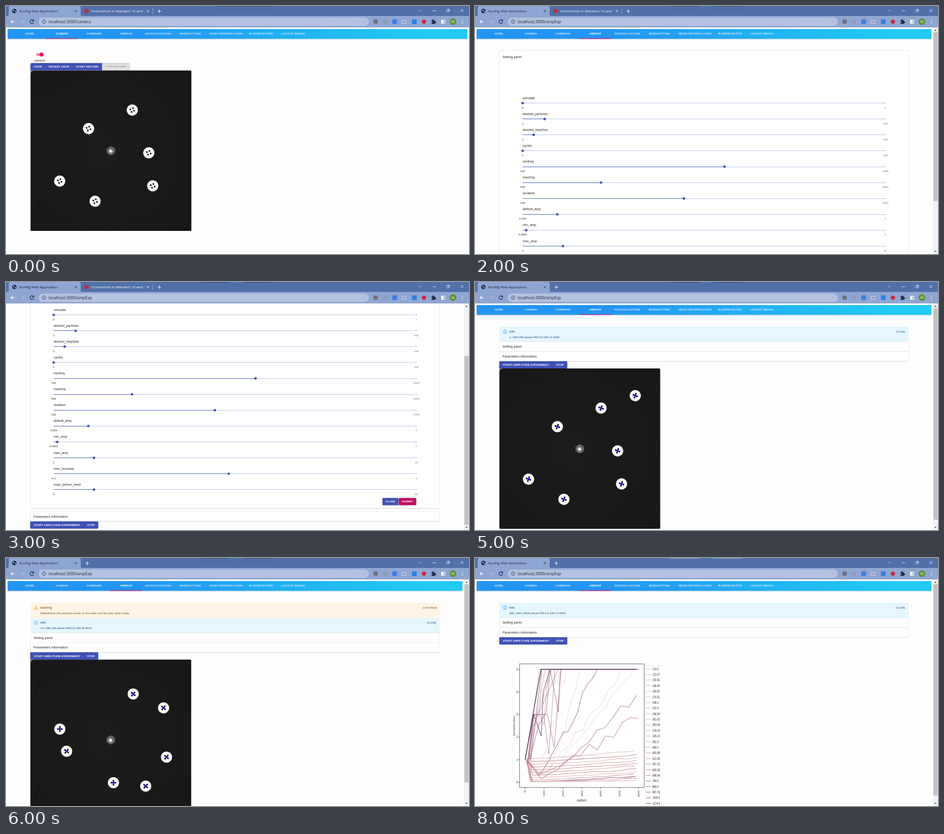
Recreate the animation shown at these times as an HTML page. Size 1022x548 px, loop 10000 ms.

```html
<!DOCTYPE html>
<html lang="en">
<head>
<meta charset="utf-8">
<title>Web application tour</title>
<style>
html, body { margin: 0; width: 100%; height: 100%; overflow: hidden; background: #fefefe; }
svg { display: block; width: 100vw; height: 100vh; }
text { font-family: "Liberation Sans", Arial, sans-serif; white-space: pre; }
.ui { font-family: "Open Sans", "Noto Sans", sans-serif; }
.b { font-weight: 700; letter-spacing: .02em; }
.p { letter-spacing: .01em; }
.m { letter-spacing: .03em; }
.plot { font-family: "DejaVu Sans", sans-serif; }
</style>
</head>
<body>
<svg id="stage" viewBox="0 0 1022 548" preserveAspectRatio="none">
  <defs>
    <linearGradient id="bar" gradientUnits="userSpaceOnUse" x1="252" y1="320" x2="770" y2="-197">
      <stop offset=".3" stop-color="#2196f3"/><stop offset=".9" stop-color="#21cbf3"/>
    </linearGradient>
    <radialGradient id="plate" cx=".45" cy=".5" r=".75">
      <stop offset="0" stop-color="#1c1c1c"/><stop offset="1" stop-color="#171717"/>
    </radialGradient>
    <filter id="shade" x="-5%" y="-40%" width="110%" height="200%">
      <feDropShadow dx="0" dy=".8" stdDeviation=".9" flood-color="#345" flood-opacity=".35"/>
    </filter>
    <clipPath id="page"><rect y="47" width="1022" height="501"/></clipPath>
    <clipPath id="tabText"><rect x="186" width="119" height="22"/></clipPath>
  </defs>
</svg>
<script>
const LOOP = 10000, STEP = 1000;
const INDIGO = '#3f51b5', PINK = '#f50057', DARK = '#202020';
const stage = document.getElementById('stage');

const rect = (x, y, w, h, fill, more = '') =>
  `<rect x="${x}" y="${y}" width="${w}" height="${h}" fill="${fill}" ${more}/>`;
const disc = (x, y, r, fill, more = '') =>
  `<circle cx="${x}" cy="${y}" r="${r}" fill="${fill}" ${more}/>`;
const path = (d, stroke, width = 1, more = '') =>
  `<path d="${d}" fill="none" stroke="${stroke}" stroke-width="${width}" ${more}/>`;
// y is the middle of the capitals
const text = (x, y, s, size, fill, cls = 'p', anchor = 'start') =>
  `<text x="${x}" y="${y + size * .36}" font-size="${size}" fill="${fill}" class="${cls}" text-anchor="${anchor}">${s}</text>`;
const cross = (x, y, r, color, width = 1) =>
  path(`M${x - r} ${y - r}l${2 * r} ${2 * r}m0 ${-2 * r}l${-2 * r} ${2 * r}`, color, width);
const plus = (x, y) => path(`M${x - 4} ${y}h8m-4 -4v8`, '#fff', 1.2);
const shaded = s => `<g filter="url(#shade)">${s}</g>`;

function randomFrom(seed) {
  return () => (seed = seed * 16807 % 2147483647) / 2147483647;
}

// ---- browser frame ----
function chrome(url, twoTabs, strip, blueX) {
  const ink = '#1d2a44';
  let s = rect(0, 0, 1022, 23, '#5070a8') + rect(0, 22, 1022, 25, '#8fa6d2') +
    rect(0, 46.4, 1022, .8, '#7f93b8');
  s += rect(431, 0, 160, 1, strip) + rect(blueX, 0, 31, 1, '#1f86e0');
  s += '<path d="M2 23q4 0 4 -5v-13q0 -5 5 -5h149q5 0 5 5v13q0 5 4 5z" fill="#8fa6d2"/>';
  s += disc(18.5, 11, 4.8, '#17233f') +
    '<path d="M15 9l3 -1 1 2 -2 2zM19 12l3 -2v3l-2 1.5z" fill="#9db2d8"/>';
  s += text(29, 11, 'NuvRig Web Application', 7.7, ink, 'ui') + cross(154, 11.3, 2.4, ink);
  if (twoTabs) {
    s += rect(173, 7, 9, 8, '#c0303a') +
      `<g clip-path="url(#tabText)">${text(188, 11, 'Screenshots in Mandero 10 and', 7.7, '#fff', 'ui')}` +
      text(302.5, 11, 'V', 7.7, '#9db0d2', 'ui') + '</g>' +
      cross(313, 11.3, 2.4, '#fff') + rect(323.5, 5, .9, 13, '#9eb1d4') + plus(338.5, 11.5);
  } else s += plus(179.5, 11.5);

  s += path('M912 8.5l3 3 3 -3', '#dce5f5', .9) + path('M942 10.5h7', '#fff', .9) +
    path('M973 8.5h4.5v4.5h-4.5zM974.5 8.5v-1.5h4.5v4.5h-1.5', '#fff', .8) + cross(1006.5, 10, 3, '#fff', .9);

  s += path('M19 34.5h-8m3.5 -3.5l-3.5 3.5 3.5 3.5', '#fff', 1.3) +
    path('M32 34.5h8m-3.5 -3.5l3.5 3.5 -3.5 3.5', '#b1c1e0', 1.1) +
    path('M60.5 32.2a4 4 0 1 0 .5 3.5M61 30v3h-3', ink, 1.3);
  s += rect(72, 25.5, 729, 18.5, '#b3c2e0', 'rx="9.2"') +
    path('M84 30.6a4 4 0 1 0 .01 0M84 34v2.8M84 32.2v1', ink, .9) +
    text(94, 34.7, url, 8.8, '#1b2233', 'ui');
  for (let i = 0; i < 4; i++) s += disc(725 + i * 21.7, 34.5, 3, '#adb9d2', 'opacity=".5"');

  s += rect(811.5, 30, 9, 9, '#6d6f78') + rect(833, 30, 8, 9, '#8c9cbd') +
    rect(853, 29.5, 10, 10, '#3c7be0') +
    path('M875 31.5h8v7h-8z', '#fff', 1.1, 'stroke-dasharray="2 1.3"') +
    rect(896, 29.5, 10.5, 10.5, '#2a83e6') + disc(922.5, 34.7, 4.8, '#d0213f') +
    `<path d="M939 32h2.5a1.7 1.7 0 1 1 3 0h2.5v2.5a1.7 1.7 0 1 1 0 3v2h-8v-2.3a1.6 1.6 0 1 0 0 -2.8z" fill="${ink}"/>` +
    rect(960.5, 30.5, 9, 8.5, '#fff') + rect(966, 31.5, 2.5, 6.5, '#8fa6d2') +
    disc(986.5, 34.5, 7.6, '#5f9636') + text(986.5, 34.7, 'M', 7, '#fff', 'ui', 'middle');
  for (let i = -1; i <= 1; i++) s += disc(1007.5, 34.5 + i * 3.5, .9, '#fff');
  return s;
}

// ---- page parts ----
const tabs = ['HOME', 'CAMERA', 'COMMAND', 'AMPEXP', 'DATACOLLECTING', 'MODELFITTING',
  'OBJECTMANIPULATION', 'BLOBDETECTOR', 'LOGOUT (MARA)'];

function nav(active, right) {
  let s = rect(3.7, 51, right - 3.7, 21.5, 'url(#bar)', 'filter="url(#shade)"');
  let x = 17;
  for (const name of tabs) {
    const w = Math.max(70.95, name.length * 4.7), on = name === active;
    s += text(x + w / 2, 61.2, name, 6.15, on ? '#fff' : '#d0eafc', 'b', 'middle');
    if (on) s += rect(x, 71.4, w, 1.1, PINK);
    x += w;
  }
  return s;
}

function button(x, y, w, label, fill = INDIGO, ink = '#fff') {
  return rect(x, y, w, 15.7, fill, 'rx="1.5"') + text(x + w / 2, y + 7.85, label, 6.15, ink, 'b', 'middle');
}

function startStop(x, y) {
  return shaded(rect(x, y, 149.7, 15.7, INDIGO, 'rx="1.7"')) +
    button(x, y, 118, 'START AMPLITUDE EXPERIMENT') + button(x + 118, y, 31.7, 'STOP') +
    rect(x + 117.8, y, .5, 15.7, '#303f9f');
}

function panel(x, y, right, h, label, labelY = y + h / 2) {
  return rect(x - .3, y, right - x + .6, h + .8, '#bdbdbd', 'rx="1.5"') +
    rect(x, y - .3, right - x, h + .3, '#e2e2e2') + rect(x, y + .3, right - x, h - .3, '#fff') +
    text(x + 7, labelY, label, 7.1, DARK);
}

function alertBox(y, kind, message, action) {
  const warn = kind === 'warning', ink = warn ? '#663c00' : '#0d3c61';
  const icon = warn
    ? path(`M66 ${y + 7}l4 7.2h-8zM66 ${y + 9.5}v2.3m0 .6v.8`, '#ff9800', .9)
    : path(`M66 ${y + 6.8}a3.9 3.9 0 1 0 .01 0m0 3.3v3.2m0 -5v.9`, '#2196f3', .9);
  return rect(53.8, y, 903, 33.4, warn ? '#fff4e5' : '#e5f6fd', 'rx="1.5"') + icon +
    text(76, y + 10.6, kind, 7.1, ink) + text(76, y + 22.4, message, 6.2, ink) +
    text(949.5 + (warn ? 2 : 0), y + 10.6, action, 5.8, ink, 'm', 'end');
}

function scrollbar(top, length) {
  return rect(1011, 47, 11, 501, '#f1f1f1') + rect(1012, top, 9, length, '#c1c1c1') +
    '<path d="M1014 55l2.5 -3 2.5 3z" fill="#505050"/><path d="M1014 541l2.5 3 2.5 -3z" fill="#505050"/>';
}

// ---- camera plate ----
const sparse = [[224.5, 87.5], [128, 128.5], [261, 182], [64.3, 244.5], [269.7, 255], [142.5, 289]];
const spread = [[227, 76], [294, 106.7], [65, 153.5], [80, 202.5], [300.5, 215.5], [183.3, 272], [254.6, 279.5]];
const added = [...sparse, [300, 60]];
const late = spread.map(([x, y], i) => [x + 18 * Math.sin(i * 2), y + 15 * Math.cos(i * 3)]);
const evenTurn = () => 20;
const mixedTurn = i => i % 3 < 2 ? 40 : 0;

function camera(x, y, pieces, turn, tracked) {
  let s = `<g transform="translate(${x} ${y})">` + rect(0, 0, 355, 354.5, 'url(#plate)', 'rx="2"') +
    '<path d="M0 0h8q-7 1 -8 8z" fill="#777"/>';
  s += '<g transform="translate(177.5 177.5)"><path d="M-9 -5l9 -5 9 5v10l-9 5 -9 -5z" fill="#2b2b2b" stroke="#777" stroke-width=".8"/>' +
    disc(0, 0, 7.5, '#555', 'stroke="#aaa" stroke-width=".9"') + disc(-.5, 1, 4.8, '#aaa') +
    '<path d="M-4 1l4 -5v4l4 1 -4 2z" fill="#fff"/></g>';
  pieces.forEach(([px, py], i) => {
    s += `<g transform="translate(${px} ${py}) rotate(${turn(i)})">` + disc(0, 0, 12.3, '#fff', 'stroke="#999" stroke-width=".5"');
    for (let k = 0; k < 4; k++) s += disc(4.4, 0, 2, '#222', `transform="rotate(${k * 90})"`);
    if (tracked) s += path('M-4.5 0h9M0 -4.5v9', '#101030', 2.6) + path('M-4 0h8M0 -4v8', '#1616ee', 1.4) + disc(0, 0, 2, '#1616ee');
    s += '</g>';
  });
  return s + '</g>';
}

// ---- settings: name, min, max, value ----
const settings = [
  ['simulate', 0, 1, 0], ['desired_particles', 1, 100, 7], ['desired_stepSize', 1, 100, 4],
  ['cycles', 1, 100, 1], ['minfreq', 100, 1000, 601], ['maxfreq', 500, 2000, 824],
  ['duration', 100, 1000, 500], ['default_amp', .005, 1, .1], ['min_amp', .0001, 1, .01],
  ['max_amp', 1, 10, 2], ['max_increase', .1, 3, 1.5], ['exps_before_reset', 5, 50, 10]];

function settingsPage() {
  const left = 105.3, width = 800.5;
  let s = panel(53.8, 98.5, 957, 543.5, 'Setting panel', 112.5);
  settings.forEach(([name, min, max, value], i) => {
    const y = 214.6 + i * 35.1, row = Math.round(y - .5), run = width * (value - min) / (max - min);
    s += text(left, y - 11.5, name, 7.1, DARK) +
      rect(left, row, width, 1, '#b8bfe3') + rect(left, row, run, 1, INDIGO) +
      rect(left + width - .5, row, 1.2, 1, INDIGO) + disc(left + run, y, 2.7, INDIGO) +
      text(left, y + 9.8, min, 6.2, DARK, 'p', 'middle') +
      text(left + width, y + 9.8, max, 6.2, '#757575', 'p', 'middle');
  });
  return s + shaded(button(831, 619.3, 35.2, 'CLOSE') + button(867, 619.3, 38.5, 'SUBMIT', '#c51162')) +
    panel(53.8, 649.3, 957, 21.3, 'Parameters Information') + startStop(53.7, 671);
}

// ---- chart ----
const shades = [[237, 209, 203], [218, 164, 168], [178, 117, 140], [128, 78, 115], [82, 49, 91], [45, 30, 62]];
function hue(t) {
  const p = Math.min(t, .999) * 5, i = Math.floor(p);
  return `rgb(${shades[i].map((c, k) => Math.round(c + (shades[i + 1][k] - c) * (p - i)))})`;
}
const plotX = x => 110.7 + x * .4175;
const plotY = y => 495.5 - y * 49.9;

function curve(points, shade, width, opacity = .8) {
  const d = points.map(([x, y]) => plotX(x).toFixed(1) + ' ' + plotY(Math.max(.02, Math.min(5, y))).toFixed(1));
  return path('M' + d.join('L'), hue(shade), width, `opacity="${opacity}" stroke-linejoin="round"`);
}

// a drop from 1, then a rise to top with some jitter
function course(from, low, top, end, bend, jitter, random) {
  const points = [[5 + random() * 12, 1], [from, low]], steps = 12;
  for (let i = 1; i <= steps; i++) {
    const u = i / steps, wobble = i < steps ? (random() - .5) * jitter * u : 0;
    points.push([from + (end - from) * u, low + (top - low) * u ** bend + wobble]);
  }
  return points;
}

function curves() {
  const random = randomFrom(77);
  let s = '';
  for (let i = 0; i < 12; i++) {
    const top = Math.max(.08, 1.37 * (1 - i / 12) ** 1.2), low = Math.max(.03, top * .95 - .25);
    s += curve(course(25 + random() * 15, low, top, 570 + random() * 30, 1.4, .08, random),
      i === 9 ? .55 : .1 + random() * .22, 1.4, .85);
  }
  // shade, final height, where it is reached
  const climbs = [[.02, 5, 220], [.03, 5, 290], [.05, 5, 510], [.05, 5, 590], [.46, 5, 382], [.37, 3.85, 590], [.34, 2.83, 600]];
  for (const [shade, top, end] of climbs)
    s += curve(course(60 + random() * 55, .15 + random() * .25, top, end, 1.15, .9, random), shade, shade > .3 ? 1.3 : 1);
  // fast climbs, every other one with a setback on the way
  for (let i = 0; i < 8; i++) {
    const start = 2 + random() * 24, peak = 72 + i * 17, setback = i % 2;
    const points = [[start, 1], [start + 25, setback ? 3 : 2.4]];
    if (setback) points.push([peak * .62, 3], [peak * .8, 1 + random() * 2]);
    points.push([peak, 5], [595, 5]);
    s += curve(points, .15 + i * .05, 1);
  }
  return s + curve([[25, 1], [70, 2.5], [112, 3.1], [132, 5], [175, 3.1], [186, 5]], .5, 1.1) +
    curve([[0, 1], [45, 3], [85, 2.05], [95, 4], [132, 5]], .9, 1.1) +
    curve([[30, 1], [87, 5], [600, 5]], .6, 1.1) + curve([[0, 1], [83, 5], [585, 5]], .9, 1.5, .95);
}

// a minor scale over three octaves and a half
const scale = [220, 246.94, 261.63, 293.66, 329.63, 349.23, 392];
function note(i) {
  const f = scale[i % 7] * 2 ** (Math.floor(i / 7) - 1), unit = f > 1000 ? 10 : 100;
  const cut = Math.floor(f * unit + 1e-6) / unit;
  return [f, Number.isInteger(cut) ? cut.toFixed(1) : cut];
}

function chart() {
  const SQUEEZE = .65, ink = '#222';
  const label = (x, y, s, size, anchor, turn = 0) =>
    `<g transform="translate(${x} ${y}) scale(${SQUEEZE} 1) rotate(${turn})">${text(0, 0, s, size, ink, 'plot', anchor)}</g>`;
  let s = rect(98.3, 234, 275.2, 273, '#fff', 'stroke="#444" stroke-width=".9"') + curves();
  for (let i = 0; i <= 5; i++)
    s += path(`M95.5 ${plotY(i)}h2.5`, ink, .8) + label(94.5, plotY(i), i, 7.4, 'end');
  for (let i = 0; i <= 6; i++) {
    const x = plotX(i * 100);
    s += path(`M${x} 507v3.5`, ink, .7) + label(x, 513.5, i * 100, 7.4, 'end', -90);
  }
  s += label(86.5, 371, 'Amplitudes', 7.8, 'middle', -90) + label(235.5, 535.5, 'expNum', 7.8, 'middle') +
    path('M409 237.5h-32.5v311', '#ddd', .7);
  for (let i = 0; i < 25; i++) {
    const y = 245 + i * 12.38, [f, name] = note(i);
    s += path(`M377.5 ${y}h10.5`, hue(f / 2300), 1.3) + label(391.5, y, name, 7.4, 'start');
  }
  return s;
}

// ---- whole views ----
function view(url, content, { twoTabs = false, scroll = 0, thumb = 0, strip = '#2c3a55', blueX = 494.5 } = {}) {
  const bar = thumb ? scrollbar(58 + scroll * thumb / 501, thumb) : '';
  return rect(0, 0, 1022, 548, '#fefefe') +
    `<g clip-path="url(#page)"><g transform="translate(0 ${-scroll})">${content}</g>${bar}</g>` +
    chrome('localhost:3000/' + url, twoTabs, strip, blueX);
}

function cameraPage() {
  return nav('CAMERA', 1018.3) + rect(66.5, 104.2, 15, 5.8, '#f58ab0', 'rx="2.9"') +
    disc(78.5, 107.2, 4.5, PINK) + text(74, 120.8, 'camera', 7.1, '#333', 'p', 'middle') +
    shaded(rect(54.2, 126.2, 218, 15.7, INDIGO, 'rx="1.7"')) +
    button(54.2, 126.2, 33, 'CROP') + button(87.2, 126.2, 60, 'REVERT CROP') +
    button(147, 126.2, 65, 'START RECORD') + button(212, 126.2, 60.3, 'STOP RECORD', '#e0e0e0', '#a8a8a8') +
    camera(54.2, 142.4, sparse, evenTurn, false);
}

function experiment(alerts, body) {
  let y = 98.9, s = nav('AMPEXP', 1007.3);
  for (const a of alerts) { s += alertBox(y, ...a); y += 33.4; }
  s += panel(53.8, y, 957, 21.2, 'Setting panel') + panel(53.8, y + 21.3, 957, 21.2, 'Parameters Information') +
    startStop(53.7, y + 42.9);
  return s + body(y + 58.8);
}
const live = (pieces, turn) => y => camera(53.8, y, pieces, turn, true) + cross(59.5, y + 360.7, 2.2, '#777', .8);
const info = message => ['info', message, 'CLOSE'];
const warning = message => ['warning', message, 'CONTINUE'];

const emptyPage = nav('AMPEXP', 1018.3) + panel(54.2, 98.7, 968, 21.2, 'Setting panel') +
  panel(54.2, 120, 968, 21.2, 'Parameters Information') + startStop(54.2, 141.6);
const statusTip = rect(-3, 533.5, 92.5, 18, '#4a6aa3', 'rx="2"') +
  text(2.5, 541.2, 'localhost:3000/ampExp', 7.5, '#fff', 'ui');
const formPage = nav('AMPEXP', 1007.3) + settingsPage();
const LIGHT_STRIP = '#aebfdf';

const views = [
  view('camera', cameraPage(), { twoTabs: true, blueX: 431.5 }),
  view('ampExp', emptyPage + statusTip, { twoTabs: true, strip: LIGHT_STRIP }),
  view('ampExp', formPage, { twoTabs: true, thumb: 373 }),
  view('ampExp', formPage, { twoTabs: true, scroll: 142, thumb: 373 }),
  view('ampExp', experiment([
    warning('Too few particles on the plate, please add more! Close info when ready. Is: 6 Should be: 7'),
    info('Starting amplitude experiment!')], live(sparse, evenTurn)), { twoTabs: true, scroll: 39.4, thumb: 438 }),
  view('ampExp', experiment([info('1 / 660 (0% done) 440.0 0.100 12.4180')], live(added, evenTurn)), { thumb: 467 }),
  view('ampExp', experiment([
    warning('Redistribute the particles evenly on the plate and hit enter when ready'),
    info('10 / 660 (2% done) 440.0 0.100 45.6524')], live(spread, mixedTurn)), { thumb: 438 }),
  view('ampExp', experiment([info('650 / 660 (98% done) 523.3 0.100 18.2047')], live(late, mixedTurn)), { thumb: 467 }),
  view('ampExp', experiment([info('660 / 660 (100% done) 523.3 0.100 17.6536')], chart), { thumb: 467, strip: LIGHT_STRIP })
];

stage.insertAdjacentHTML('beforeend', views.map(v => `<g class="view" display="none">${v}</g>`).join(''));
const groups = [...stage.querySelectorAll('.view')];
const start = performance.now();
let shown = -1;

function draw(ms) {
  const step = Math.min(Math.floor(ms / STEP), groups.length - 1);
  if (step === shown) return;
  groups.forEach((g, i) => g.setAttribute('display', i === step ? 'inline' : 'none'));
  shown = step;
}
function tick() {
  draw((performance.now() - start) % LOOP);
  requestAnimationFrame(tick);
}
draw(0);
requestAnimationFrame(tick);
</script>
</body>
</html>
```
